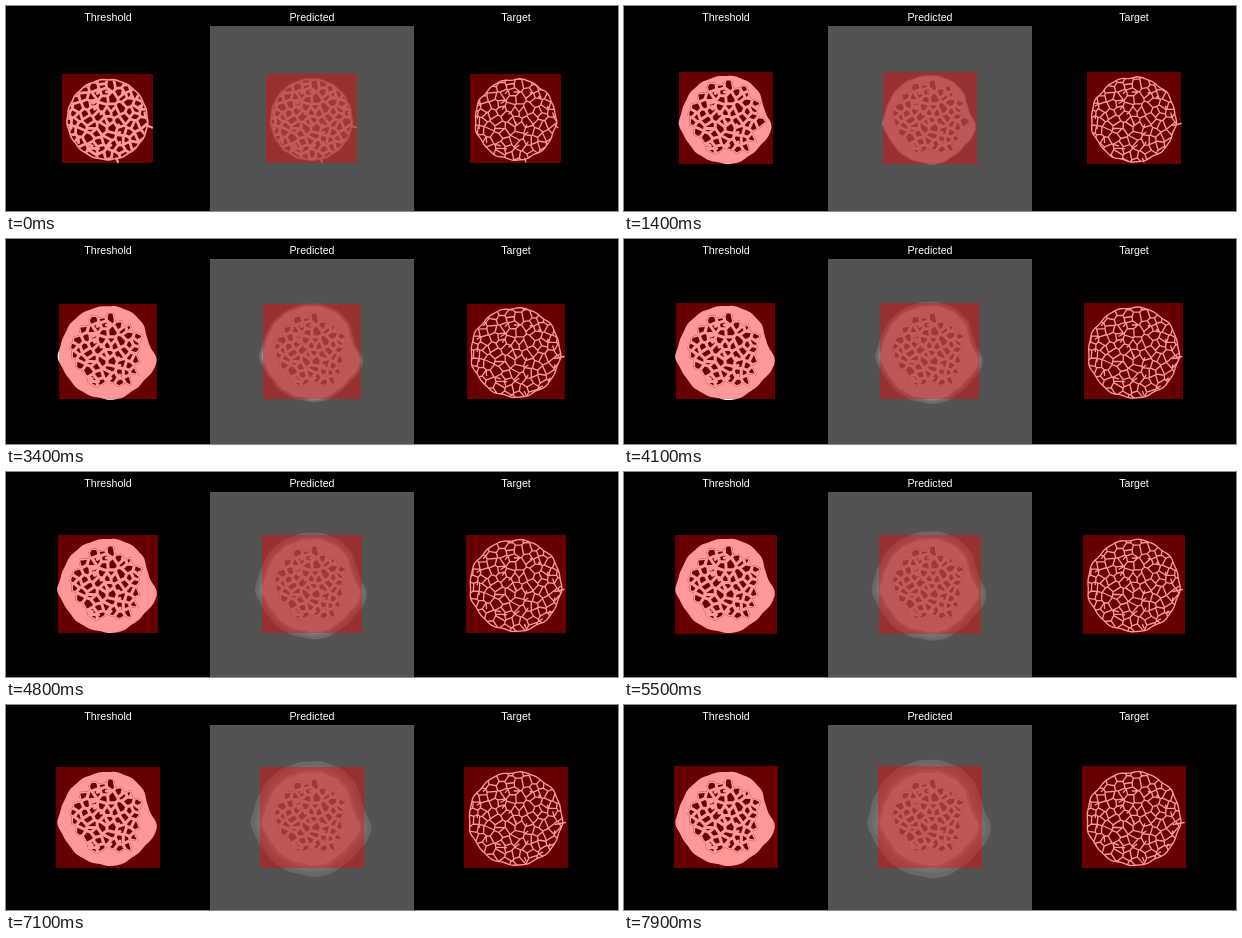
Write an HTML page with a canvas that moves like this. It is 612x205 px and loops after 8000 ms.

```html
<!DOCTYPE html>
<html lang="en">
<head>
<meta charset="utf-8">
<title>Cell mask comparison</title>
<style>
html, body { margin: 0; width: 100%; height: 100%; overflow: hidden; background: #000; }
canvas { display: block; }
</style>
</head>
<body>
<canvas id="stage" width="612" height="205"></canvas>
<script>
const ctx = document.getElementById('stage').getContext('2d');
const PANEL = 204, TOP = 20, STEP = 100, STEPS = 80;
const CX = 101.5, CY = 113.5, TAU = Math.PI * 2;

// Growth curves, sampled at these steps
const KEYS = [0, 14, 27, 41, 48, 62, 79];
const CURVES = {
  left: [56, 55, 53, 52, 52, 50, 50],
  right: [147, 149, 150, 151, 152, 153, 154],
  top: [68, 66, 65, 64, 63, 63, 61],
  bottom: [157, 158, 160, 160, 161, 162, 163],
  body: [40.8, 43.4, 45.7, 46.2, 46.2, 46.2, 46.2],
  bump: [0.1, 0.85, 1, 1, 1, 1, 1],
  halo: [41.5, 44.2, 46.8, 50.3, 52.5, 55.3, 58.3],
  holes: [43, 35.5, 35, 35, 35, 35, 35],
  wall: [2.8, 3, 3.1, 3.1, 3.1, 3.1, 3.1],
  net: [40.4, 42.2, 43.8, 45.2, 45.6, 46.2, 46.6],
  spur: [144, 149, 150, 150, 150, 150.5, 152]
};

function sample(values, step) {
  let i = 0;
  while (i < KEYS.length - 2 && step > KEYS[i + 1]) i++;
  const f = (step - KEYS[i]) / (KEYS[i + 1] - KEYS[i]);
  return values[i] + (values[i + 1] - values[i]) * f;
}

let seed = 29;
function rand() {
  seed = (seed * 16807) % 2147483647;
  return seed / 2147483647;
}

// Keep the part of a polygon that is closer to a than to b
function clipCell(poly, a, b) {
  const nx = b[0] - a[0], ny = b[1] - a[1];
  const mid = nx * (a[0] + b[0]) / 2 + ny * (a[1] + b[1]) / 2;
  const out = [];
  poly.forEach((p, i) => {
    const q = poly[(i + 1) % poly.length];
    const dp = p[0] * nx + p[1] * ny - mid;
    const dq = q[0] * nx + q[1] * ny - mid;
    if (dp <= 0) out.push(p);
    if (dp * dq < 0) {
      const f = dp / (dp - dq);
      out.push([p[0] + (q[0] - p[0]) * f, p[1] + (q[1] - p[1]) * f]);
    }
  });
  return out;
}

function makeSites(count) {
  return Array.from({ length: count }, (_, i) => {
    const r = 49 * Math.sqrt((i + 0.5) / count), a = i * 2.39996;
    return [r * Math.cos(a) + (rand() - 0.5) * 6, r * Math.sin(a) + (rand() - 0.5) * 6];
  });
}

const sites = makeSites(116);
const frame = [[-60, -60], [60, -60], [60, 60], [-60, 60]];
const cells = sites.map(s =>
  sites.reduce((poly, other) => other === s ? poly : clipCell(poly, s, other), frame));

function trace(path, points) {
  points.forEach(([x, y], i) => i ? path.lineTo(x, y) : path.moveTo(x, y));
}

// Cell walls, with short dangling ones inside some cells
const walls = new Path2D();
cells.forEach((cell, i) => {
  trace(walls, cell);
  walls.closePath();
  if (i % 4) return;
  const [x, y] = cell[0], f = 0.5 + 0.4 * rand();
  trace(walls, [cell[0], [x + (sites[i][0] - x) * f, y + (sites[i][1] - y) * f]]);
});

function polar(radius) {
  const path = new Path2D();
  for (let i = 0; i < 180; i++) {
    const a = i / 180 * TAU, r = radius(a);
    path.lineTo(r * Math.cos(a), r * Math.sin(a));
  }
  path.closePath();
  return path;
}

function bulge(a, center, width) {
  const d = ((a * 360 / TAU - center + 540) % 360) - 180;
  return Math.exp(-d * d / (2 * width * width));
}

function outline(base, bump) {
  return polar(a => base + 0.3 * Math.sin(a * 17) + bump * (
    3.7 * bulge(a, 174, 10) + 4.5 * bulge(a, 12, 11) + 1.8 * bulge(a, 79, 9)
    - 4.2 * bulge(a, 345, 13) + 0.9 * bulge(a, 220, 22)
    + 0.8 * bulge(a, 132, 18) + 0.8 * bulge(a, 290, 18)));
}

function stroke(path, color, width) {
  ctx.strokeStyle = color;
  ctx.lineWidth = width;
  ctx.stroke(path);
}

function fill(path, color) {
  ctx.fillStyle = color;
  ctx.fill(path);
}

function spurs(x, y, color, width) {
  const path = new Path2D();
  trace(path, [[39.5, 6], [x - CX, y - CY]]);
  trace(path, [[9, 39], [10.5, 42.5]]);
  stroke(path, color, width);
}

// Open the cells that lie within the hole radius
function punchHoles(v, hole, wall) {
  const open = new Path2D();
  cells.forEach((cell, i) => {
    if (Math.hypot(...sites[i]) > v.holes) return;
    trace(open, cell);
    open.closePath();
  });
  ctx.save();
  ctx.clip(outline(v.body - 1.6, v.bump));
  fill(open, hole);
  ctx.clip(open);
  stroke(walls, wall, v.wall);
  ctx.restore();
}

function threshold(v) {
  fill(outline(v.body, v.bump), '#fff');
  punchHoles(v, '#000', '#fff');
  spurs(146, 121.5, '#fff', 2.2);
}

function predicted(v) {
  const grow = v.halo - v.body;
  ctx.filter = 'blur(0.7px)';
  fill(outline(v.halo, v.bump), 'rgb(104,104,104)');
  fill(outline(v.body + grow * 0.6, v.bump), 'rgb(112,112,112)');
  fill(outline(v.body + grow * 0.2, v.bump), 'rgb(124,124,124)');
  fill(outline(v.body - 0.5, v.bump), 'rgb(146,146,146)');
  punchHoles(v, 'rgb(94,94,94)', 'rgb(152,152,152)');
  spurs(146, 121.5, 'rgb(146,146,146)', 2);
  ctx.filter = 'none';
}

function target(v) {
  const edge = polar(a => v.net + 0.6 * Math.sin(a * 9 + 1) + 0.4 * Math.sin(a * 16));
  ctx.save();
  ctx.clip(edge);
  stroke(walls, '#fff', 1.35);
  ctx.restore();
  stroke(edge, '#fff', 1.35);
  spurs(v.spur, v.spur > 147 ? 117.5 : 121.5, '#fff', 1.35);
}

const panels = [
  ['Threshold', threshold, '#000'],
  ['Predicted', predicted, '#535353'],
  ['Target', target, '#000']
];

function draw(step) {
  const v = {};
  for (const key in CURVES) v[key] = sample(CURVES[key], step);
  const [left, right, top, bottom] = [v.left, v.right, v.top, v.bottom].map(Math.round);
  ctx.fillStyle = '#000';
  ctx.fillRect(0, 0, 612, 205);
  ctx.lineJoin = ctx.lineCap = 'round';
  ctx.font = '8pt "Liberation Sans", Arial, sans-serif';
  ctx.textAlign = 'center';
  panels.forEach(([title, paint, back], i) => {
    ctx.save();
    ctx.translate(i * PANEL, 0);
    ctx.fillStyle = back;
    ctx.fillRect(0, TOP, PANEL, 205 - TOP);
    ctx.save();
    ctx.translate(CX, CY);
    paint(v);
    ctx.restore();
    ctx.fillStyle = 'rgba(255,0,0,0.4)';
    ctx.fillRect(left, top, right - left, bottom - top);
    ctx.fillStyle = '#fff';
    ctx.fillText(title, PANEL / 2, 15);
    ctx.restore();
  });
}

let shown = -1;
function tick() {
  const step = Math.floor(performance.now() / STEP) % STEPS;
  if (step !== shown) draw(shown = step);
  requestAnimationFrame(tick);
}
tick();
</script>
</body>
</html>
```
